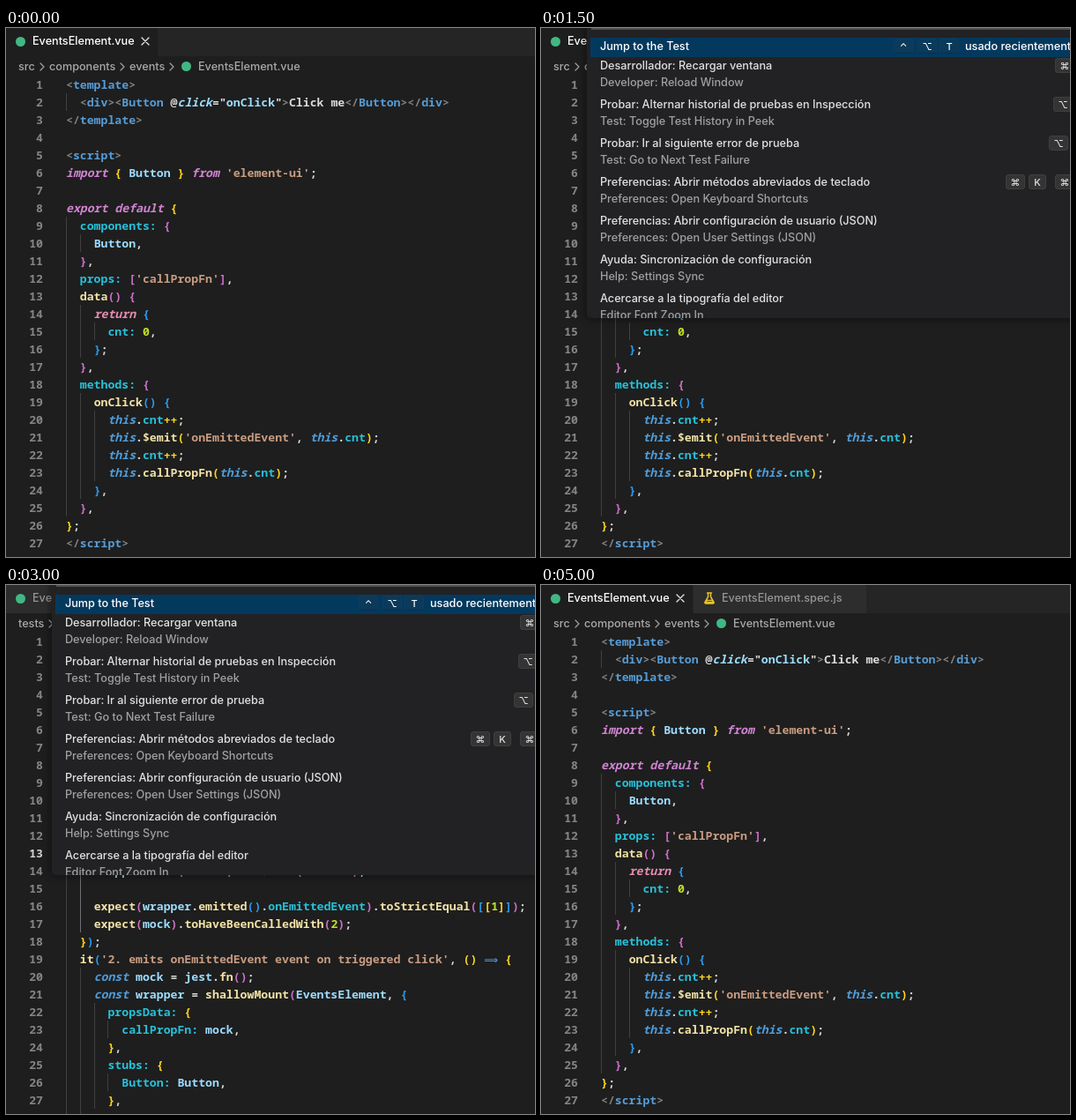
Animation, 600 px wide and 600 px high, one loop 5500 ms. Source, as an HTML page:

```html
<!DOCTYPE html>
<html lang="es">
<head>
<meta charset="utf-8">
<title>Jump to the Test</title>
<style>
html, body { margin: 0; width: 100%; height: 100%; overflow: hidden; background: #1e1e1e; }
#stage { position: relative; width: 600px; height: 600px; overflow: hidden; background: #1e1e1e;
  font: 450 12.65px/20px Inter, Roboto, sans-serif; color: #a9a9a9; }
#stage div, #stage svg { position: absolute; white-space: pre; }
#stage svg { overflow: visible; fill: none; stroke-linecap: round; stroke-linejoin: round; }
#stage .hidden { display: none; }

.strip { left: 0; top: 0; width: 600px; height: 32px; background: #252526; }
.tab { top: 0; height: 32px; background: #2d2d2d; color: #969696; }
.tab.active { background: #1e1e1e; color: #fff; }
.tab:not(.active) .close { display: none; }
.tab.preview { font-style: italic; }
.close { stroke: #e4e4e4; stroke-width: 1.3; }
.chevron { stroke: #a0a0a0; stroke-width: 1.2; }
.flask { stroke: #e6c229; stroke-width: 1.5; }
.dot { width: 11px; height: 11px; border-radius: 50%; background: #41b883; }

.line { left: 68px; height: 20px; font: 600 13.18px/20px "Noto Sans Mono", "DejaVu Sans Mono", monospace; }
.num { width: 40px; text-align: right; left: -66px; color: #858585; }
.num.current { color: #d0d0d0; }
.guide { top: 0; width: 1px; height: 20px; background: #404040; }
.guide.block { left: 84px; top: 174px; height: 220px; background: #707070; }
.g { color: #808080; } .b { color: #569cd6; } .a { color: #9cdcfe; } .w { color: #dadada; }
.o { color: #c99c80; } .y { color: #f3e3a6; } .c { color: #26c1d9; } .n { color: #c3e02a; }
.i { color: #9cdcfe; } .t { color: #4f9cd9; } .p { color: #d083d2; } .r { color: #e58bb0; }
.i, .t, .p, .r { font-style: italic; }
.k1, .z { color: #ffd71c; } .k2 { color: #d06fcd; } .k3 { color: #2a9df0; }
.focus .z { outline: 1px solid #8c8c8c; outline-offset: -1px; }
.u { color: #569cd6; display: inline-block; width: 2ch; }
.u b { font: bold 11px/10px "DejaVu Sans", sans-serif; }

#palette { left: 52px; top: -10px; width: 560px; height: 339px; overflow: hidden; background: #222224;
  border-radius: 0 0 0 5px; color: #e0e0e0; }
#shade { left: 52px; top: -10px; width: 560px; height: 339px; border-radius: 5px;
  box-shadow: 0 0 8px 2px rgba(0, 0, 0, .4); }
.input { left: 5px; top: 0; width: 560px; height: 10px; background: #303031; border-bottom: 2px solid #505052; }
.pick { left: 4px; top: 21px; width: 560px; height: 22px; background: #04395e; }
.sub { color: #a0a0a0; }
.white { color: #fff; }
.key { height: 17px; line-height: 17px; text-align: center; border-radius: 3px; font-size: 11px;
  font-family: Inter, "DejaVu Sans", sans-serif; background: #343435; border: 1px solid #3f3f40; box-sizing: border-box; }
.key.plain { color: #fff; background: #0b3a5a; border-color: #103c5a #103c5a #0a2f4c; }
</style>
</head>
<body>
<div id="stage"></div>
<script>
const vueCode = `~g<~btemplate~g>
  ~g<~bdiv~g><~bButton ~w@~iclick~w="~aonClick~w"~g>~wClick me~g</~bButton~g></~bdiv~g>
~g</~btemplate~g>

~g<~bscript~g>
~pimport ~1{ ~aButton ~1} ~pfrom ~o'element-ui'~w;

~pexport default ~1{
  ~ccomponents: ~2{
    ~aButton~w,
  ~2}~w,
  ~cprops: ~2[~o'callPropFn'~2]~w,
  ~ydata~2() {
    ~rreturn ~3{
      ~ccnt: ~n0~w,
    ~3}~w;
  ~2}~w,
  ~cmethods: ~2{
    ~yonClick~3() {
      ~tthis~w.~ccnt~1++~w;
      ~tthis~w.~y$emit~1(~o'onEmittedEvent'~w, ~tthis~w.~ccnt~1)~w;
      ~tthis~w.~ccnt~1++~w;
      ~tthis~w.~ycallPropFn~1(~tthis~w.~ccnt~1)~w;
    ~3}~w,
  ~2}~w,
~1}~w;
~g</~bscript~g>
`;

const setup = `    ~tconst ~amock ~w= ~ajest~w.~yfn~2()~w;
    ~tconst ~awrapper ~w= ~yshallowMount~2(~aEventsElement~w, ~3{
      ~cpropsData: ~1{
        ~ccallPropFn: ~amock~w,
      ~1}~w,`;

const specCode = `~pimport ~1{ ~ashallowMount ~1} ~pfrom ~o'@vue/test-utils'~w;
~pimport ~aEventsElement ~pfrom ~o'@/components/events/EventsElement'~w;
~pimport ~1{ ~aButton ~1} ~pfrom ~o'element-ui'~w;

~ydescribe~1(~o'EventsElement.vue'~w, ~2() ~u ~2{
  ~yit~3(~o'1. emits onEmittedEvent event on emitted click'~w, ~1() ~u ~z{
${setup}
    ~3}~2)~w;
    
    ~awrapper~w.~yfind~2(~aButton~2)~w.~cvm~w.~y$emit~2(~o'click'~2)~w;
    
    ~yexpect~2(~awrapper~w.~yemitted~3()~w.~conEmittedEvent~2)~w.~ytoStrictEqual~2(~3[~1[~n1~1]~3]~2)~w;
    ~yexpect~2(~amock~2)~w.~ytoHaveBeenCalledWith~2(~n2~2)~w;
  ~z}~3)~w;
  ~yit~3(~o'2. emits onEmittedEvent event on triggered click'~w, ~1() ~u ~1{
${setup}
      ~cstubs: ~1{
        ~cButton: ~aButton~w,
      ~1}~w,
    ~3}~2)~w;`;

const stage = document.getElementById("stage");

function add(parent, cls, text = "", style = {}, tag = "div") {
  const el = document.createElement(tag);
  el.className = cls;
  el.textContent = text;
  Object.assign(el.style, style);
  parent.append(el);
  return el;
}

// Text starting at x and vertically centred on cy
const label = (parent, x, cy, text, cls = "") =>
  add(parent, cls, text, { left: x + "px", top: cy - 10 + "px" });

function icon(parent, cls, x, y, path) {
  parent.insertAdjacentHTML("beforeend",
    `<svg class="${cls}" width="1" height="1" style="left:${x}px;top:${y}px"><path d="${path}"/></svg>`);
}
const close = (p, x, y) => icon(p, "close", x, y, "M-4-4L4 4M4-4L-4 4");
const chevron = (p, x, y) => icon(p, "chevron", x, y, "M-2-4L2 0L-2 4");
const flask = (p, x, y) => icon(p, "flask", x, y,
  "M-2.5-6H2.5M-1.5-6V-1.5L-5 4.5Q-5.5 6 -4 6H4Q5.5 6 5 4.5L1.5-1.5V-6M-3 2.5H3L4 4.8H-4Z");
const dot = (p, x, y) => add(p, "dot", "", { left: x - 5.5 + "px", top: y - 5.5 + "px" });

function editor(code, current) {
  const box = add(stage, "");
  code.split("\n").forEach((source, i) => {
    const line = add(box, "line", "", { top: 54 + 20 * i + "px" });
    const [indent, ...parts] = source.split("~");
    add(line, "num" + (i + 1 === current ? " current" : ""), i + 1);
    for (let col = 0; col < indent.length; col += 2)
      add(line, "guide", "", { left: col + "ch" });
    line.append(indent);
    for (const part of parts) {
      const kind = part[0], cls = kind > "9" ? kind : "k" + kind;
      const span = add(line, cls, part.slice(1), {}, "span");
      if (kind === "u") {
        span.innerHTML = "<b>⟹</b>";
        line.append(" ");
      }
    }
  });
  return box;
}

function crumbs(parent, names, xs, chevrons) {
  names.forEach((name, i) => label(parent, xs[i], 44, name));
  chevrons.forEach(x => chevron(parent, x, 43.5));
}

const vue = editor(vueCode);
const spec = editor(specCode, 13);
add(spec, "guide block");
crumbs(vue, ["src", "components", "events", "EventsElement.vue"], [14, 49, 140, 218], [41, 132, 188]);
dot(vue, 204, 43.5);
crumbs(spec, ["tests", "unit", "components", "events", "EventsElement.spec.js"],
  [14, 59, 99, 190, 268], [51, 91, 182, 237]);
flask(spec, 254, 43.5);

const strip = add(stage, "strip");
const vueTab = add(strip, "tab", "", { left: 0, width: "172px" });
dot(vueTab, 16, 15);
label(vueTab, 30, 15, "EventsElement.vue");
close(vueTab, 158, 15);
const specTab = add(strip, "tab", "", { left: "173px", width: "196px" });
flask(specTab, 18, 15);
label(specTab, 32, 15, "EventsElement.spec.js");
close(specTab, 182, 15);

const shade = add(stage, "");
shade.id = "shade";
const palette = add(stage, "");
palette.id = "palette";
add(palette, "input");
add(palette, "pick");
// Palette contents use stage coordinates
const list = add(palette, "", "", { left: "-52px", top: "10px" });
label(list, 67, 21, "Jump to the Test", "white");
label(list, 481, 21, "usado recientemente", "white");
[
  ["Desarrollador: Recargar ventana", "Developer: Reload Window"],
  ["Probar: Alternar historial de pruebas en Inspección", "Test: Toggle Test History in Peek"],
  ["Probar: Ir al siguiente error de prueba", "Test: Go to Next Test Failure"],
  ["Preferencias: Abrir métodos abreviados de teclado", "Preferences: Open Keyboard Shortcuts"],
  ["Preferencias: Abrir configuración de usuario (JSON)", "Preferences: Open User Settings (JSON)"],
  ["Ayuda: Sincronización de configuración", "Help: Settings Sync"],
  ["Acercarse a la tipografía del editor", "Editor Font Zoom In"]
].forEach(([title, sub], i) => {
  label(list, 67, 43 + 44 * i, title);
  label(list, 67, 62 + 44 * i, sub, "sub");
});
[
  [400, 21, "⌃"], [427, 21, "⌥"], [452, 21, "T"],
  [583, 43, "⌘"], [581, 87, "⌥"], [576, 131, "⌥"],
  [527, 175, "⌘"], [553, 175, "K", 20], [583, 175, "⌘"]
].forEach(([x, cy, text, width = 22]) =>
  add(list, cy === 21 ? "key plain" : "key", text,
    { left: x + "px", top: cy - 9 + "px", width: width + "px" }));

function show(el, on) { el.classList.toggle("hidden", !on); }

function render(now) {
  const t = now % 5500;
  const inSpec = t >= 2000 && t < 4000;
  const open = (t >= 1000 && t < 2000) || (t >= 3000 && t < 4000);
  show(vue, !inSpec);
  show(spec, inSpec);
  show(specTab, t >= 2000);
  show(palette, open);
  show(shade, open);
  vueTab.classList.toggle("active", !inSpec);
  specTab.classList.toggle("active", inSpec);
  specTab.classList.toggle("preview", inSpec);
  spec.classList.toggle("focus", !open);
  requestAnimationFrame(render);
}
render(0);
</script>
</body>
</html>
```
